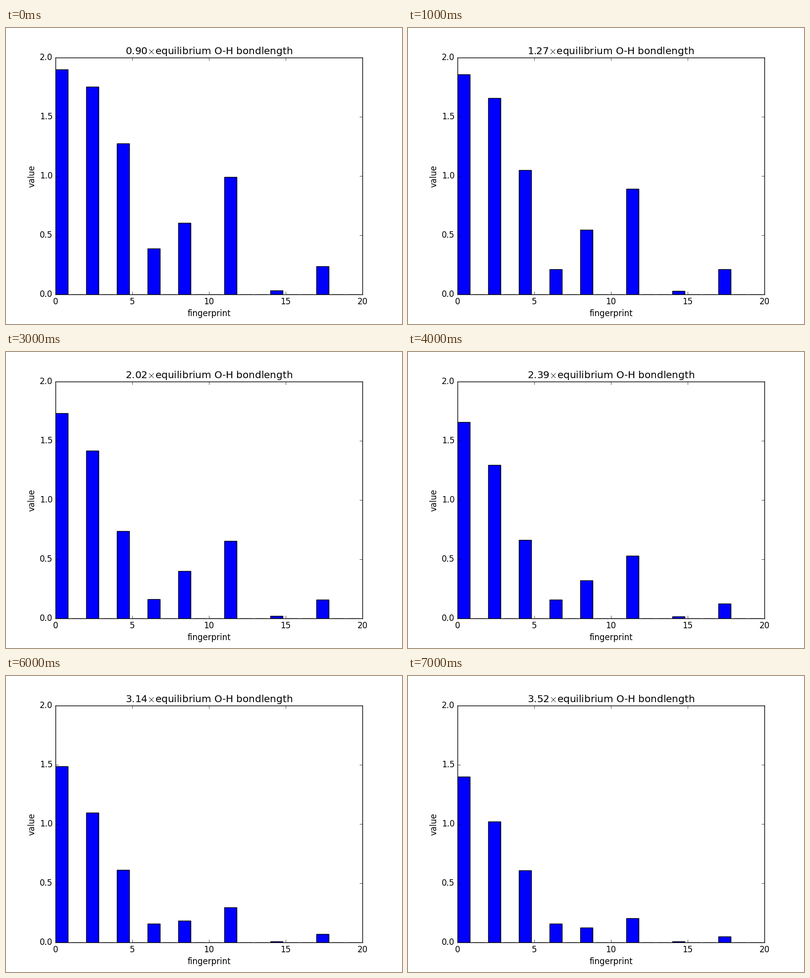
Animation, 800 px wide and 600 px high, one loop 8 s. Source, as a matplotlib script:

```python
import numpy as np
import matplotlib.pyplot as plt
from matplotlib.animation import FuncAnimation

plt.style.use("classic")
plt.rcParams["font.family"] = "DejaVu Sans"

FRAMES, INTERVAL = 8, 1000
CUTOFF = 6.5
BOND = 0.96857          # equilibrium O-H distance
COS_ANGLE = -0.2419     # H-O-H angle
STRETCH = np.linspace(0.9, 8.0, 20)


def cutoff(r):
    return 0.5 * (1 + np.cos(np.pi * r / CUTOFF)) if r < CUTOFF else 0.0


def radial(eta, distances):
    return sum(np.exp(-eta * (r / CUTOFF) ** 2) * cutoff(r) for r in distances)


def angular(eta, zeta, gamma, a, b):
    c = np.sqrt(a * a + b * b - 2 * a * b * COS_ANGLE)
    decay = np.exp(-eta * (a * a + b * b + c * c) / CUTOFF ** 2)
    shape = 2.0 ** (1 - zeta) * (1 + gamma * COS_ANGLE) ** zeta
    return shape * decay * cutoff(a) * cutoff(b) * cutoff(c)


def fingerprint(stretch):
    """Symmetry functions around oxygen with one bond stretched."""
    a, b = BOND, BOND * stretch
    values = np.zeros(20)
    values[0:8:2] = [radial(eta, (a, b)) for eta in (0.05, 4, 20, 80)]
    values[8::3] = [angular(0.005, zeta, gamma, a, b)
                    for zeta in (1, 4) for gamma in (1, -1)]
    return values


fig = plt.figure(figsize=(8, 6), dpi=100, facecolor="white")
ax = fig.add_axes([0.125, 0.1, 0.775, 0.8])
bars = ax.bar(np.arange(20), np.zeros(20), width=0.8, align="edge",
              color="blue", edgecolor="black", linewidth=1)
ax.set_xlim(0, 20)
ax.set_ylim(0, 2)
ax.set_xticks(range(0, 21, 5))
ax.set_yticks(np.arange(0, 2.1, 0.5))
ax.set_xlabel("fingerprint")
ax.set_ylabel("value")
title = ax.set_title("")


def update(i):
    stretch = STRETCH[i]
    for bar, value in zip(bars, fingerprint(stretch)):
        bar.set_height(value)
    title.set_text(rf"{stretch:.2f}$\times$equilibrium O-H bondlength")
    return [*bars, title]


anim = FuncAnimation(fig, update, frames=FRAMES, interval=INTERVAL,
                     repeat=True, repeat_delay=0, blit=False)
plt.show()
```
